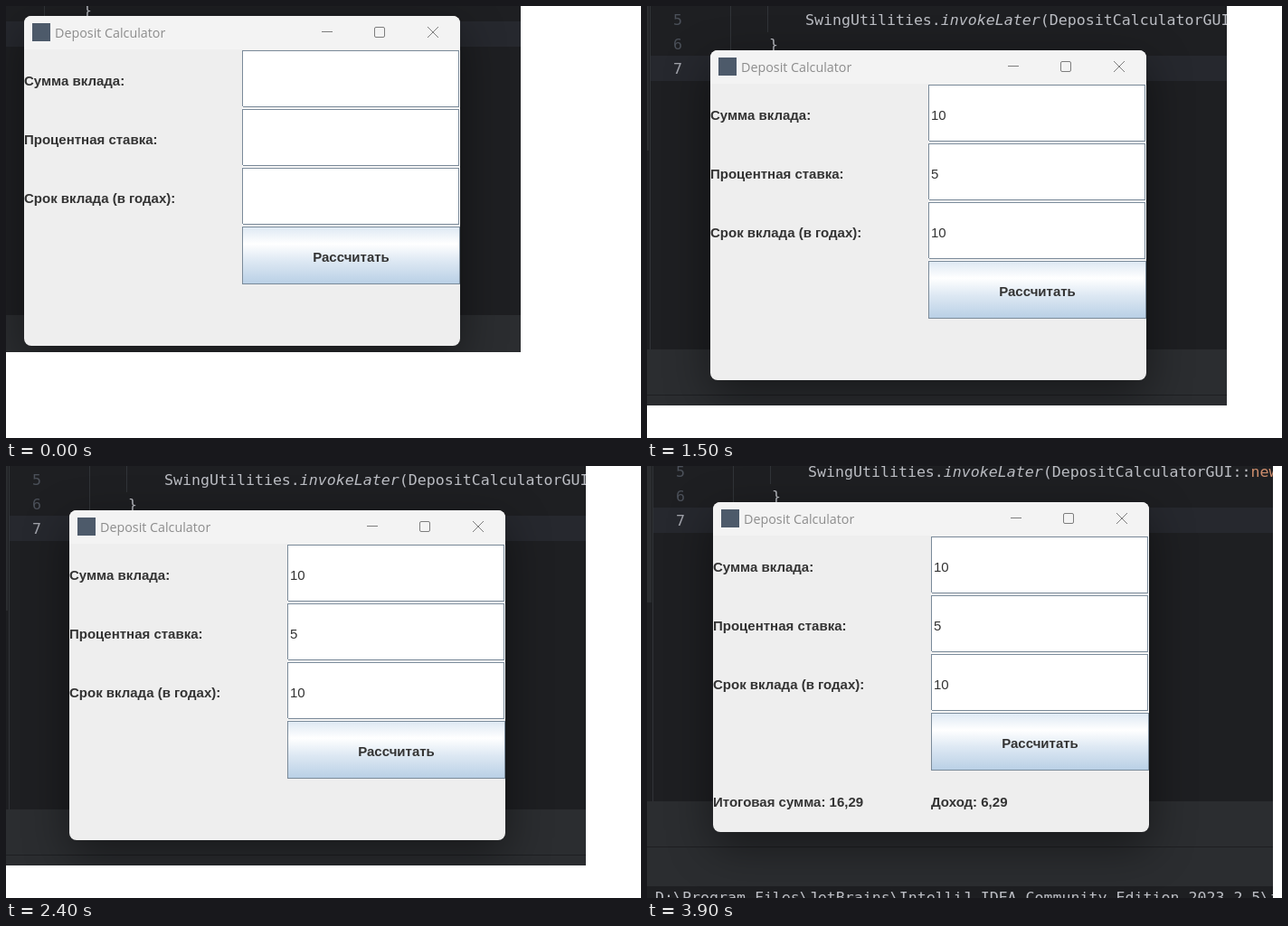
An HTML page with a canvas that plays this animation: 702 by 478 pixels, repeating every 4500 ms.

```html
<!DOCTYPE html>
<html lang="ru">
<head>
<meta charset="utf-8">
<title>Deposit Calculator</title>
<style>
html, body { margin: 0; width: 100%; height: 100%; overflow: hidden; background: #fff; }
canvas { display: block; }
</style>
</head>
<body>
<canvas id="stage" width="702" height="478"></canvas>
<script>
const ctx = document.getElementById('stage').getContext('2d', { alpha: false });
const HOLD = 1500;
const MONO = '16.6px "DejaVu Sans Mono", monospace';
const PLAIN = '15px "Liberation Sans", Arial, sans-serif';
const BOLD = 'bold ' + PLAIN;

// Each scene: visible area, window position, and what the form shows.
const scenes = [
  { w: 569, h: 383, x: 20, y: 11, values: [], results: [] },
  { w: 641, h: 442, x: 70, y: 49, values: ['10', '5', '10'], results: [] },
  { w: 692, h: 478, x: 73, y: 40, values: ['10', '5', '10'],
    results: ['Итоговая сумма: 16,29', 'Доход: 6,29'] }
];
const labels = ['Сумма вклада:', 'Процентная ставка:', 'Срок вклада (в годах):'];

function rect(x, y, w, h, color) {
  ctx.fillStyle = color;
  ctx.fillRect(x, y, w, h);
}

function text(str, x, y, font, color, align = 'left') {
  ctx.font = font;
  ctx.fillStyle = color;
  ctx.textAlign = align;
  ctx.fillText(str, x, y);
}

function line(...points) {
  ctx.beginPath();
  for (let i = 0; i < points.length; i += 4) {
    ctx.moveTo(points[i], points[i + 1]);
    ctx.lineTo(points[i + 2], points[i + 3]);
  }
  ctx.stroke();
}

// Editor coordinates are relative to the window's top left corner.
function drawEditor() {
  rect(-90, -60, 800, 520, '#1e1f22');
  rect(-66, 6, 760, 28, '#26282e');
  rect(-80, -60, 12, 171, '#2b2d30');
  rect(-67, -60, 1, 391, '#313438');
  rect(22, -60, 1, 66, '#313438');
  rect(63, -60, 1, 40, '#313438');

  text('5', -41, -28, MONO, '#4b5059');
  text('6', -41, -1, MONO, '#4b5059');
  text('7', -41, 26, MONO, '#a1a3ab');
  const code = [
    ['SwingUtilities.', '#bcbec4', ''],
    ['invokeLater', '#bcbec4', 'italic '],
    ['(DepositCalculatorGUI::', '#bcbec4', ''],
    ['new', '#cf8e6d', '']
  ];
  let x = 105;
  for (const [part, color, style] of code) {
    text(part, x, -28, style + MONO, color);
    x += ctx.measureText(part).width;
  }
  text('}', 65, -1, MONO, '#bcbec4');

  rect(-90, 331, 800, 94, '#2b2d30');
  rect(-90, 381, 800, 1, '#1e1f22');
  text('D:\\Program Files\\JetBrains\\IntelliJ IDEA Community Edition 2023.2.5\\jbr',
    -64, 443, MONO, '#bcbec4');
}

function drawField(y, value) {
  rect(241, y, 241, 65, '#fff');
  rect(241, y, 240, 1, '#7a8a99');
  rect(241, y, 1, 62, '#7a8a99');
  rect(480, y + 1, 1, 62, '#7a8a99');
  rect(242, y + 62, 239, 1, '#7a8a99');
  rect(241, y + 63, 241, 1, '#eee');
  if (value) text(value, 244, y + 39, PLAIN, '#333');
}

function drawButton() {
  const shade = ctx.createLinearGradient(0, 233, 0, 297);
  shade.addColorStop(0, '#dde8f3');
  shade.addColorStop(0.3, '#fff');
  shade.addColorStop(0.6, '#dde8f3');
  shade.addColorStop(1, '#b8cfe5');
  rect(241, 233, 241, 64, shade);
  ctx.strokeStyle = '#7a8a99';
  ctx.strokeRect(241.5, 233.5, 240, 63);
  text('Рассчитать', 361.5, 272, BOLD, '#333', 'center');
}

function drawTitleBar() {
  rect(0, 0, 482, 37, '#f3f3f3');
  rect(9, 8, 20, 20, '#4d5a6a');
  text('Deposit Calculator', 34, 24, '14.3px "Open Sans", sans-serif', '#8c8c8c');
  ctx.strokeStyle = '#7d7d7d';
  line(329, 17.5, 341, 17.5);
  ctx.beginPath();
  ctx.roundRect(387.5, 12.5, 11, 11, 1.5);
  ctx.stroke();
  line(446, 12, 458, 24, 458, 12, 446, 24);
}

function drawWindow({ values, results }) {
  ctx.save();
  ctx.beginPath();
  ctx.roundRect(0, 0, 482, 365, 8);
  ctx.shadowColor = 'rgba(0, 0, 0, 0.45)';
  ctx.shadowBlur = 50;
  ctx.shadowOffsetY = 16;
  ctx.fillStyle = '#eee';
  ctx.fill();
  ctx.shadowColor = 'transparent';
  ctx.clip();

  drawTitleBar();
  labels.forEach((label, i) => {
    drawField(38 + 65 * i, values[i]);
    text(label, 0, 77 + 65 * i, BOLD, '#333');
  });
  drawButton();
  results.forEach((result, i) => text(result, 241 * i, 337, BOLD, '#333'));
  ctx.restore();
}

function draw(now) {
  const scene = scenes[Math.floor(now / HOLD) % scenes.length];
  rect(0, 0, 702, 478, '#fff');
  ctx.save();
  ctx.beginPath();
  ctx.rect(0, 0, scene.w, scene.h);
  ctx.clip();
  ctx.translate(scene.x, scene.y);
  drawEditor();
  drawWindow(scene);
  ctx.restore();
}

const start = performance.now();
function tick() {
  draw(performance.now() - start);
  requestAnimationFrame(tick);
}
tick();
</script>
</body>
</html>
```
